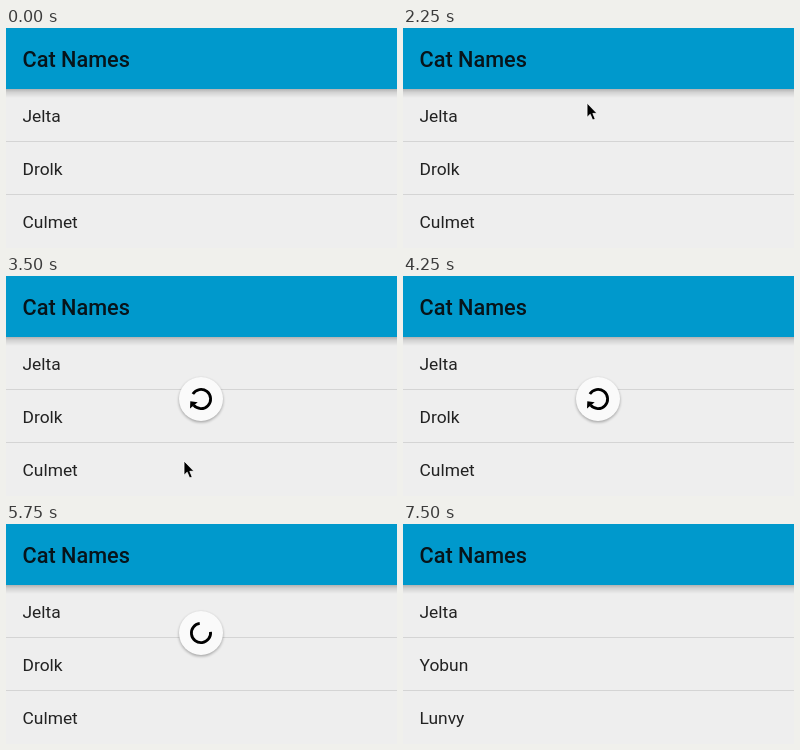
An HTML page that plays this animation: 391x220 px, repeating every 8 s.

```html
<!DOCTYPE html>
<html lang="en">
<head>
<meta charset="utf-8">
<title>Pull to refresh</title>
<style>
  html, body { margin: 0; width: 100%; height: 100%; overflow: hidden; background: #eee; }
  svg { display: block; width: 391px; height: 220px; font-family: Roboto, sans-serif; }
  .row { font-size: 17.4px; fill: #222; }
  .title { font-size: 21.7px; font-weight: 500; fill: #07141a; }
  .line { fill: #d4d4d4; }
</style>
</head>
<body>
<svg viewBox="0 0 391 220">
  <defs>
    <linearGradient id="fade" x1="0" y1="0" x2="0" y2="1">
      <stop offset="0" stop-color="#000" stop-opacity=".25"/>
      <stop offset=".4" stop-color="#000" stop-opacity=".11"/>
      <stop offset="1" stop-color="#000" stop-opacity="0"/>
    </linearGradient>
    <filter id="soft" x="-20%" y="-20%" width="140%" height="140%">
      <feGaussianBlur stdDeviation="1.4"/>
    </filter>
  </defs>
  <rect width="391" height="220" fill="#eee"/>
  <text class="row" x="16.5" y="94"></text>
  <text class="row" x="16.5" y="147"></text>
  <text class="row" x="16.5" y="199.5"></text>
  <rect class="line" y="113" width="391" height="1"/>
  <rect class="line" y="166" width="391" height="1"/>
  <rect y="61" width="391" height="9" fill="url(#fade)"/>
  <g id="spinner">
    <circle cy="1.3" r="22" opacity=".32" filter="url(#soft)"/>
    <circle r="22" fill="#fafafa"/>
    <g id="ring">
      <path id="arc" fill="none" stroke="#000" stroke-width="2.8"/>
      <path id="head" d="M-5 0H5L0 5.5Z"/>
    </g>
  </g>
  <rect width="391" height="61" fill="#0099cc"/>
  <text class="title" x="16.5" y="39">Cat Names</text>
  <path id="cursor" d="M0 0V14.2L3.2 11.2L5.6 17L8.2 15.9L5.8 10.3H10Z"
        fill="#000" stroke="#fff" stroke-width=".8" stroke-linejoin="round"/>
</svg>
<script>
const LOOP = 8000, STEP = 250, RADIUS = 9.6;
const PULL = 2500, RELEASE = 4250, SPIN = 5200, DONE = 7250, GONE = 7500;
const CYCLE = 1333, LONG = 288, SHORT = 53;

const before = ['Jelta', 'Drolk', 'Culmet'];
const after = ['Jelta', 'Yobun', 'Lunvy'];
const $ = id => document.getElementById(id);
const rows = document.querySelectorAll('.row');

// Pointer tip: time, x, y
const path = [
  [250, 181, 138], [750, 172, 77], [1250, 179, 103], [1750, 187, 84],
  [2500, 183, 72], [3000, 189, 205], [3500, 178, 185]
];

const clamp = v => Math.min(1, Math.max(0, v));
const mix = (a, b, k) => a + (b - a) * k;
const smooth = v => { const k = clamp(v); return k * k * (3 - 2 * k); };

function pointerAt(time) {
  if (time < path[0][0] || time >= RELEASE) return null;
  const next = path.findIndex(p => p[0] > time);
  if (next < 0) return path[path.length - 1].slice(1);
  const a = path[next - 1], b = path[next];
  const k = smooth((time - a[0]) / (b[0] - a[0]));
  return [mix(a[1], b[1], k), mix(a[2], b[2], k)];
}

// Dragged down, the ring winds up and turns solid at the end
function pull(time) {
  const p = clamp((time - PULL) / 1000);
  return {
    y: 123 - 96 * (1 - p) ** 2,
    end: 500 - 554 * (1 - p),
    sweep: LONG * clamp(2 * p),
    arrow: mix(.7, 1, p),
    ink: p < 1 ? .33 : 1
  };
}

// Released, the ring shortens, then the head and tail chase each other
function spin(time) {
  const k = clamp((time - RELEASE) / 750);
  const turns = Math.max(0, time - SPIN) / CYCLE;
  const whole = Math.floor(turns), part = turns - whole;
  const grow = (LONG - SHORT) * smooth(2 * part);
  const end = 500 + 122 * k + 350 * turns + (LONG - SHORT) * whole + grow;
  const tail = (LONG - SHORT) * smooth(2 * part - 1);
  return {
    y: mix(123, 109, clamp((time - RELEASE) / 500)),
    end,
    sweep: mix(LONG, SHORT, k) + grow - tail,
    arrow: time < SPIN ? mix(1, .85, k) : 0,
    ink: 1
  };
}

function polar(deg) {
  const a = deg * Math.PI / 180;
  return [RADIUS * Math.cos(a), RADIUS * Math.sin(a)].map(v => v.toFixed(2)).join(' ');
}

function show(el, on) {
  el.style.display = on ? '' : 'none';
}

function drawSpinner(time) {
  const on = time > PULL && time < GONE;
  show($('spinner'), on);
  if (!on) return;
  const { y, end, sweep, arrow, ink } = time < RELEASE ? pull(time) : spin(time);
  const scale = clamp((GONE - time) / 500);
  const large = sweep > 180 ? 1 : 0;
  $('spinner').setAttribute('transform', `translate(195 ${y}) scale(${scale})`);
  $('ring').setAttribute('opacity', ink);
  $('arc').setAttribute('d',
    `M${polar(end - sweep)}A${RADIUS} ${RADIUS} 0 ${large} 1 ${polar(end)}`);
  $('head').setAttribute('transform', `rotate(${end}) translate(${RADIUS} -.3) scale(${arrow})`);
}

function draw(time) {
  const tip = pointerAt(time);
  show($('cursor'), tip);
  if (tip) $('cursor').setAttribute('transform', `translate(${tip})`);
  drawSpinner(time);
  const names = time < DONE ? before : after;
  rows.forEach((row, i) => row.textContent = names[i]);
}

const begin = performance.now();
let last = -1;
function tick() {
  const time = Math.floor((performance.now() - begin) % LOOP / STEP) * STEP;
  if (time !== last) draw(last = time);
  requestAnimationFrame(tick);
}
tick();
</script>
</body>
</html>
```
